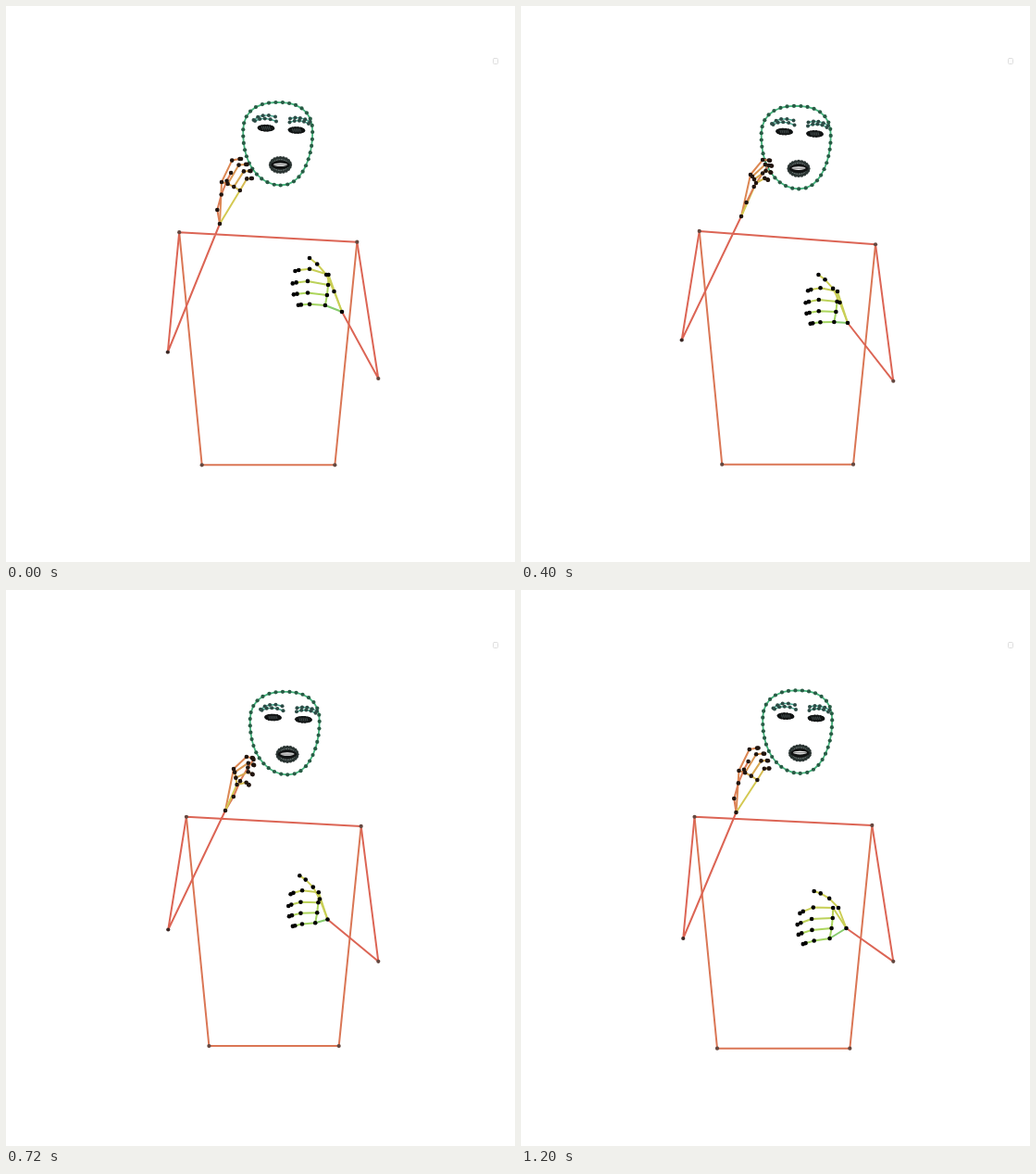
An HTML page with a canvas that plays this animation: 550x600 px, repeating every 1280 ms.

```html
<!DOCTYPE html>
<html lang="en">
<head>
<meta charset="utf-8">
<title>Pose skeleton</title>
<style>
  html, body { margin: 0; width: 100%; height: 100%; overflow: hidden; background: #fff; }
  canvas { display: block; width: 550px; height: 600px; }
</style>
</head>
<body>
<canvas id="stage"></canvas>
<script>
const STEP = 80, STEPS = 16, TAU = Math.PI * 2;
const canvas = document.getElementById('stage');
const ctx = canvas.getContext('2d');
const ratio = window.devicePixelRatio || 1;
canvas.width = 550 * ratio;
canvas.height = 600 * ratio;

// Gesture keys: step, left wrist, right wrist, head offset, left elbow y,
// knuckle lean and knuckle drop of the left hand.
const gesture = [
  [0, 231, 235, 363, 330, 0, 0, 373.5, 2, 9],
  [2, 235.5, 224, 353, 338, -4.4, 2.5, 363, 9, 11],
  [5, 238, 227, 353, 342, 3.5, 3.9, 360.5, 10, 9],
  [7, 234, 224.5, 352, 352, 8.4, 5.2, 359.5, 9, 7.5],
  [9, 237, 238, 347.5, 355.5, 7.5, 5.8, 366.5, 9, 17],
  [11, 236.5, 258, 350, 351, 6.3, 6, 380, 11.5, 26.5],
  [15, 232.5, 240, 351.5, 365, 5, 4.4, 376, 3, 10]
];

// Cubic through the keys without overshoot.
function sample(keys, step) {
  let i = 0;
  while (i < keys.length - 2 && keys[i + 1][0] <= step) i++;
  const a = keys[i], b = keys[i + 1], span = b[0] - a[0], u = (step - a[0]) / span;
  const slope = (n, k) => (keys[n + 1][k] - keys[n][k]) / (keys[n + 1][0] - keys[n][0]);
  const tangent = (n, k) => {
    if (n === 0) return slope(0, k);
    if (n === keys.length - 1) return slope(n - 1, k);
    const p = slope(n - 1, k), q = slope(n, k);
    return p * q > 0 ? 2 * p * q / (p + q) : 0;
  };
  return a.slice(1).map((v, j) => {
    const k = j + 1, d = b[k] - v, m = tangent(i, k) * span, n = tangent(i + 1, k) * span;
    return v + u * (m + u * (3 * d - 2 * m - n + u * (m + n - 2 * d)));
  });
}

const range = (n, fn) => Array.from({ length: n }, (_, i) => fn(i));
const shift = (points, dx, dy) => points.map(([x, y]) => [x + dx, y + dy]);
const ring = (x, y, rx, ry, n) => range(n, i =>
  [x + rx * Math.cos(i / n * TAU), y + ry * Math.sin(i / n * TAU)]);

function line(points, color, width = 2, closed = false) {
  ctx.beginPath();
  points.forEach(p => ctx.lineTo(p[0], p[1]));
  if (closed) ctx.closePath();
  ctx.strokeStyle = color;
  ctx.lineWidth = width;
  ctx.stroke();
}

function dots(points, color, r) {
  ctx.fillStyle = color;
  for (const [x, y] of points) {
    ctx.beginPath();
    ctx.arc(x, y, r, 0, TAU);
    ctx.fill();
  }
}

function oval(x, y, rx, ry, color, tilt = 0) {
  ctx.beginPath();
  ctx.ellipse(x, y, rx, ry, tilt, 0, TAU);
  ctx.fillStyle = color;
  ctx.fill();
}

// Points at equal distances along a closed curve.
function evenly(curve, n) {
  const path = range(721, i => curve(i / 720 * TAU));
  let total = 0;
  const reach = path.map((p, i) =>
    i ? total += Math.hypot(p[0] - path[i - 1][0], p[1] - path[i - 1][1]) : 0);
  return range(n, i => path[reach.findIndex(d => d >= i / n * total)]);
}

// Rounded crown, longer jaw.
const outline = evenly(a => {
  const c = Math.cos(a), s = Math.sin(a);
  const round = (v, e) => Math.sign(v) * Math.abs(v) ** e;
  const e = s < 0 ? .84 : .95;
  return [293.7 + 37.5 * round(c, e) + (s > 0 ? 3 * s ** 4 : 0), 136 + (s < 0 ? 32 : 57.5) * round(s, e)];
}, 36);

const arc = (x0, y0, x1, y1, x2, y2) => range(5, i => {
  const t = i / 4, u = 1 - t;
  return [u * u * x0 + 2 * u * t * x1 + t * t * x2, u * u * y0 + 2 * u * t * y1 + t * t * y2];
});
const brows = [
  arc(267.5, 123, 276, 115, 291, 119.5), arc(269, 124, 279, 118.5, 292, 124.5),
  arc(307, 121.5, 318, 118.5, 328.5, 125), arc(306.5, 125.5, 317, 121, 327, 127)
];

// Four joints on a bowed line from a to b.
function finger(a, b, bow, t1, t2) {
  const dx = b[0] - a[0], dy = b[1] - a[1];
  return [0, t1, t2, 1].map(t => {
    const s = 4 * t * (1 - t) * bow;
    return [a[0] + dx * t - dy * s, a[1] + dy * t + dx * s];
  });
}

// Raised hand: curls in and opens again once per loop.
function raisedHand(turn, lean, drop) {
  const c = Math.cos(turn), spread = 11 + 9 * Math.cos(turn + .2), lift = 18 + 7 * c;
  const thumb = finger([3.3 - 6 * c, -15], [lean + 24 - .7 * spread, -55], -.04, .4, .77);
  return [thumb, ...range(4, i => {
    const t = i / 3, x = lean + spread * t, y = -45 + drop * t ** 1.4;
    const bulge = 3 * Math.sin(t * Math.PI);
    return finger([x, y], [x + 21 - 8 * t + bulge, y - lift + 12 * t], -.28, .77, .97);
  })];
}

// Lowered hand: tips sink steadily while the reach breathes.
function loweredHand(turn, step) {
  const c = Math.cos(turn), sink = 1.2 * step, reach = 33 + 3 * c;
  const x0 = -12 - 2.5 * c, y0 = -40 + sink;
  const thumb = finger([-8.5, -22], [x0 - 20.5, y0 - 18], .09, .435, .775);
  return [thumb, ...range(4, i => {
    const x = x0 - .4 * i * i, y = y0 + 11 * i;
    const long = reach * (1 + .13 * i - .065 * i * i);
    return finger([x, y], [x - long, y + .55 * sink * (1 - .12 * i) - 4 * .4 ** i], .11 - .025 * i, .58, .9);
  })];
}

function drawHand(wrist, shape, colors, dot) {
  const fingers = shape.map(f => shift(f, wrist[0], wrist[1]));
  const base = fingers.map(f => f[0]);
  line([wrist, base[0]], colors[0]);
  line([wrist, base[1]], colors[1]);
  for (let i = 1; i < 4; i++) line([base[i], base[i + 1]], colors[i + 1]);
  line([base[4], wrist], colors[5]);
  fingers.forEach((f, i) => line(f, colors[i]));
  dots([wrist, ...fingers.flat()], dot, 2.3);
}

function drawEye(x, y) {
  oval(x, y, 9.5, 3.7, '#1b1f1f', .06);
  dots(ring(x, y, 7.3, 2.3, 14), '#111414', 1.6);
  for (let i = -2; i <= 2; i++) line([[x + i * 2 - .6, y - 1.6], [x + i * 2 + .4, y + 1.5]], '#677', .5);
}

function drawMouth(x, y) {
  oval(x, y, 11.5, 8, '#222827');
  dots(ring(x, y, 10.6, 7.6, 20), '#2b3533', 2);
  ctx.setLineDash([1, 1.6]);
  line(ring(x, y, 9, 5.9, 30), '#8b9693', .8, true);
  ctx.setLineDash([]);
  oval(x, y, 10.3, 4.6, '#101212');
  oval(x, y - .3, 7.5, 1.8, '#f2f2f2');
  line([[x - 7, y - .2], [x + 7, y - .2]], '#444', .7);
}

function drawFace(dx, dy) {
  const edge = shift(outline, dx, dy);
  line(edge, '#45b57d', 1.8, true);
  dots(edge, '#285c45', 2.1);
  for (const brow of brows) {
    const b = shift(brow, dx, dy);
    line(b, '#45a68f', 1.5);
    dots(b, '#2d4c46', 2);
  }
  drawEye(281 + dx, 131.7 + dy);
  drawEye(314 + dx, 134 + dy);
  drawMouth(296.5 + dx, 171.5 + dy);
}

function drawBody(turn, wl, wr, elbowY) {
  const c = Math.cos(turn), s = Math.sin(turn);
  const left = 4.2 - 4 * c, right = 2.2 - 2.4 * Math.cos(turn + .2);
  const hipY = 493.9 + 2 * Math.cos(turn - .8);
  const sl = [187 + left, 244.2 - 1.4 * s], sr = [379.5 + right, 255.2 - .5 * c + 2 * s];
  const hl = [211.5 + left, hipY], hr = [355.5 + right, hipY];
  const el = [174.8 - 1.2 * s, elbowY], er = [402.3, 402 + 3 * s];
  line([sl, hl, hr, sr], '#da7655');
  line([wl, el, sl, sr, er, wr], '#dc6555');
  dots([sl, sr, er, hl, hr], '#654840', 2.1);
  dots([el], '#3b2926', 2.1);
}

function draw(step) {
  ctx.setTransform(ratio, 0, 0, ratio, 0, 0);
  ctx.fillStyle = '#fff';
  ctx.fillRect(0, 0, 550, 600);
  ctx.lineJoin = ctx.lineCap = 'round';

  ctx.strokeStyle = '#dedede';
  ctx.lineWidth = 1;
  ctx.beginPath();
  ctx.roundRect(526.5, 56.5, 5, 6, 1);
  ctx.stroke();

  const turn = step / STEPS * TAU;
  const [lx, ly, rx, ry, hx, hy, elbowY, lean, drop] = sample(gesture, step);
  const wl = [lx, ly], wr = [rx, ry];
  drawBody(turn, wl, wr, elbowY);
  drawFace(hx, hy);
  drawHand(wl, raisedHand(turn, lean, drop),
    ['#db7d56', '#dc8753', '#da9653', '#d8a953', '#d5bb52', '#d4c952'], '#21150f');
  drawHand(wr, loweredHand(turn, step),
    ['#ccce54', '#c8cf56', '#bcd25a', '#add65c', '#a2d461', '#86cb6c'], '#000');
}

function tick(now) {
  draw(Math.floor(now / STEP) % STEPS);
  requestAnimationFrame(tick);
}
draw(0);
requestAnimationFrame(tick);
</script>
</body>
</html>
```
